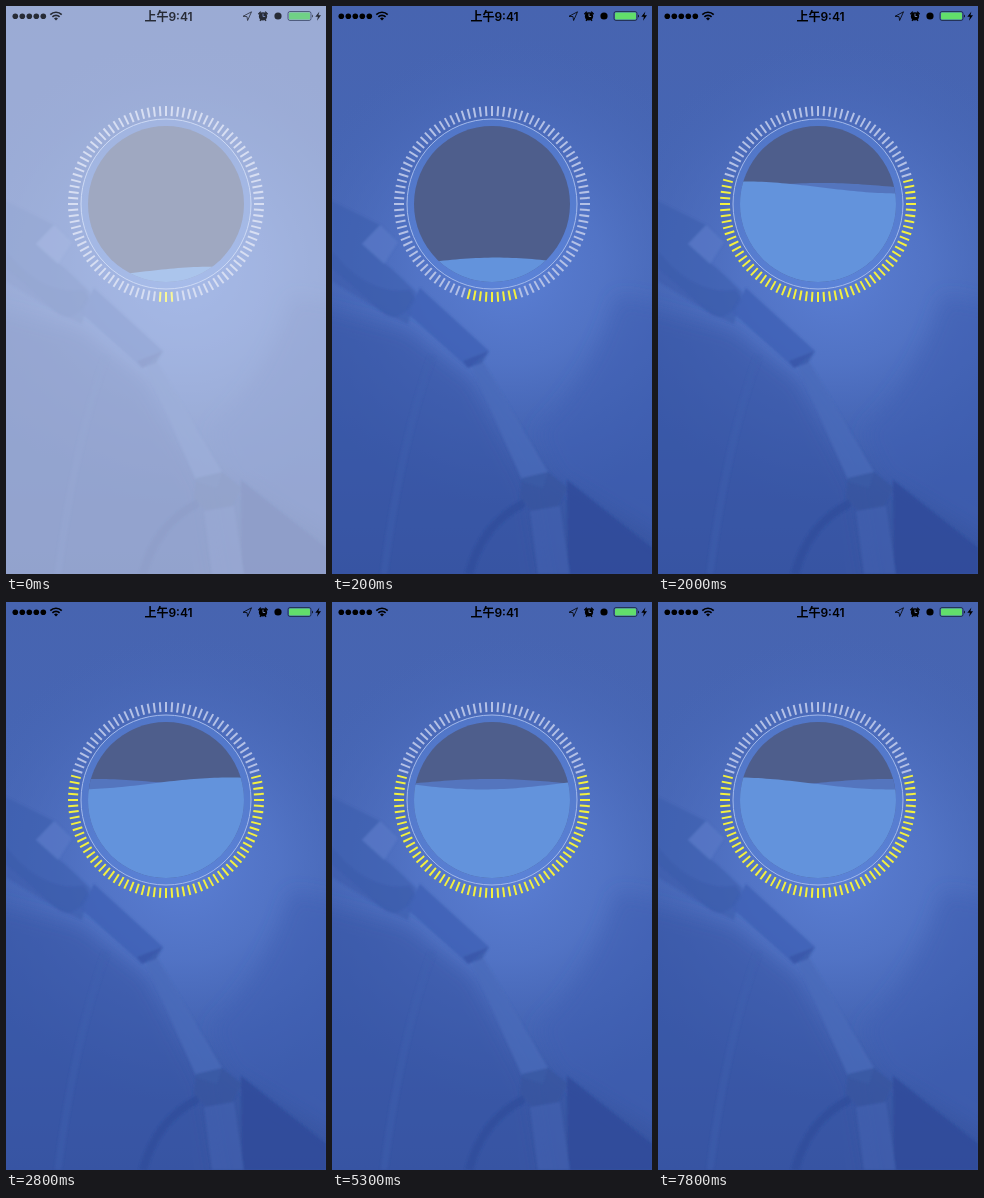
An HTML page that plays this animation: 320x568 px, repeating every 7.9 s.

```html
<!DOCTYPE html>
<html lang="zh">
<head>
<meta charset="utf-8">
<title>Water gauge</title>
<style>
  html, body { margin: 0; width: 100%; height: 100%; overflow: hidden; background: #4464b0; }
  svg { display: block; width: 100%; height: 100%; }
  text { font: 600 12px Inter, "Noto Sans CJK SC", "Noto Sans CJK", sans-serif; }
</style>
</head>
<body>
<svg viewBox="0 0 320 568">
  <defs>
    <linearGradient id="base" x1="0" y1="0" x2="0" y2="1">
      <stop offset="0" stop-color="#4764b0"/>
      <stop offset=".45" stop-color="#4566b6"/>
      <stop offset=".75" stop-color="#3c5cab"/>
      <stop offset="1" stop-color="#37539f"/>
    </linearGradient>
    <radialGradient id="glow" gradientUnits="userSpaceOnUse" cx="178" cy="265" r="235">
      <stop offset="0" stop-color="#5b7fd4"/>
      <stop offset=".4" stop-color="#5476c8" stop-opacity=".85"/>
      <stop offset=".7" stop-color="#4d6dbd" stop-opacity=".5"/>
      <stop offset="1" stop-color="#4766b4" stop-opacity="0"/>
    </radialGradient>
    <filter id="soft"><feGaussianBlur stdDeviation="1"/></filter>
    <filter id="haze"><feGaussianBlur stdDeviation="9"/></filter>
    <clipPath id="bowl"><circle cx="160" cy="198" r="78"/></clipPath>
  </defs>

  <!-- backdrop -->
  <rect width="320" height="568" fill="url(#base)"/>
  <rect width="320" height="568" fill="url(#glow)"/>
  <g filter="url(#haze)">
    <path d="M-20 300L75 325L140 375L195 480L215 600H-20Z" fill="#3856a6" opacity=".6"/>
    <path d="M285 290Q262 370 205 425L225 470L340 540V300Z" fill="#3e5fb2" opacity=".55"/>
  </g>
  <g filter="url(#soft)">
    <path d="M235 474L320 542V568H236Z" fill="#2f4b9a" opacity=".8"/>
    <path d="M0 195L48 219L30 238L62 265L84 286L76 318L50 306L0 262Z" fill="#3d5eae" opacity=".6"/>
    <path d="M48 219L66 236L52 258L30 238Z" fill="#5a7cc8" opacity=".6"/>
    <path d="M0 245Q35 290 78 284L84 294Q65 320 50 306L0 275Z" fill="#3856a6" opacity=".4"/>
    <path d="M88 282L157 345L136 362L74 306Z" fill="#3f61b4" opacity=".75"/>
    <path d="M157 345L150 357L136 362L131 355Z" fill="#3452a2" opacity=".6"/>
    <path d="M140 362L151 356L216 466L211 482L191 476Z" fill="#4a6bba" opacity=".75"/>
    <path d="M190 472L216 466L236 482L226 500L200 505L188 492Z" fill="#37549f" opacity=".7"/>
    <path d="M198 505L228 500L238 568H206Z" fill="#4564b2" opacity=".6"/>
    <path d="M192 497Q150 518 137 568" fill="none" stroke="#2f4c9a" stroke-width="8" opacity=".7"/>
    <path d="M100 350Q68 440 52 568" fill="none" stroke="#4161b0" stroke-width="7" opacity=".4"/>
  </g>

  <!-- gauge -->
  <circle cx="160" cy="198" r="85" fill="#5f8be0" fill-opacity=".38" stroke="#a3b9ea" stroke-width="1"/>
  <g clip-path="url(#bowl)">
    <rect x="80" y="118" width="160" height="160" fill="#4e5e8c"/>
    <path id="back" fill="#5475be"/>
    <path id="front" fill="#6393dc"/>
  </g>
  <g id="ticks" stroke-width="2"></g>

  <rect id="veil" width="320" height="568" fill="#fff"/>

  <g id="status">
    <g id="dots"></g>
    <g fill="none" stroke="#000" stroke-width="1.6">
      <path d="M44.3 8.6a8 8 0 0 1 11.4 0M46.4 10.9a5 5 0 0 1 7.2 0"/>
    </g>
    <path d="M50 14.6l-2-2.1a2.8 2.8 0 0 1 4 0Z"/>
    <text x="162.5" y="14.5" text-anchor="middle">上午9:41</text>
    <path d="M237 10.3L245.5 5.8L241.6 14.5L241 10.6Z" fill="none" stroke="#000" stroke-width=".8" stroke-linejoin="round"/>
    <circle cx="257" cy="10.3" r="4.1"/>
    <path d="M252.4 8.2l2.4-2.6M261.6 8.2l-2.4-2.6M254 14.8l1.2-1.5M260 14.8l-1.2-1.5" stroke="#000" stroke-width="1.4"/>
    <path d="M257 7.6v2.9h2.2" fill="none" stroke="#7d92cc" stroke-width=".8"/>
    <circle cx="272" cy="10" r="3.6"/>
    <rect x="282" y="5.5" width="23" height="9" rx="2" fill="none" stroke="#1c2742" stroke-width=".8"/>
    <rect x="283" y="6.5" width="21" height="7" rx="1" fill="#62de6b"/>
    <path d="M306 8.4a2 2 0 0 1 0 3.2Z"/>
    <path d="M313.4 5.5L309.3 10.8H311.9L311 14.8L315 9.2H312.4Z"/>
  </g>
</svg>
<script>
  const LOOP = 7900, STEP = 100;
  const CX = 160, BOTTOM = 276, SIZE = 156;
  const FULL = 0.606, MAX_SIDE = 29;
  const K = 2 * Math.PI / 312;
  const VEIL = [0.46, 0.16];

  const $ = id => document.getElementById(id);
  const add = (parent, tag, attrs) => {
    const el = document.createElementNS('http://www.w3.org/2000/svg', tag);
    for (const key in attrs) el.setAttribute(key, attrs[key]);
    return parent.appendChild(el);
  };

  for (let i = 0; i < 5; i++) add($('dots'), 'circle', { cx: 9.3 + i * 7, cy: 10.2, r: 2.8 });

  // Ticks are counted from the bottom, clockwise
  const ticks = Array.from({ length: 100 }, (_, i) => add($('ticks'), 'line', {
    x1: CX, x2: CX, y1: 286, y2: 296, transform: `rotate(${i * 3.6} ${CX} 198)`
  }));

  function wave(level, amp, phase) {
    let d = 'M80 280';
    for (let x = 80; x <= 240; x += 4) {
      d += `L${x} ${(level - amp * Math.sin(K * (x - CX) + phase)).toFixed(2)}`;
    }
    return d + 'L240 280Z';
  }

  function draw(n) {
    const level = BOTTOM - SIZE * Math.min(FULL, 0.06 + 0.029 * n);
    $('front').setAttribute('d', wave(level, 6, 0.62 + 0.4365 * n));
    $('back').setAttribute('d', wave(level, 4.5, 0.193 * n - 2.36));

    const side = Math.min(MAX_SIDE, Math.round(1 + 1.55 * n));
    ticks.forEach((tick, i) => {
      const lit = Math.min(i, 100 - i) <= side;
      tick.setAttribute('stroke', lit ? '#f3f03f' : '#b4c1e6');
    });

    const veil = VEIL[n] || 0;
    $('veil').setAttribute('opacity', veil);
    $('status').setAttribute('opacity', 1 - veil * 0.55);
  }

  const start = performance.now();
  function tick() {
    const t = Math.max(0, performance.now() - start) % LOOP;
    draw(Math.floor(t / STEP));
    requestAnimationFrame(tick);
  }
  tick();
</script>
</body>
</html>
```
